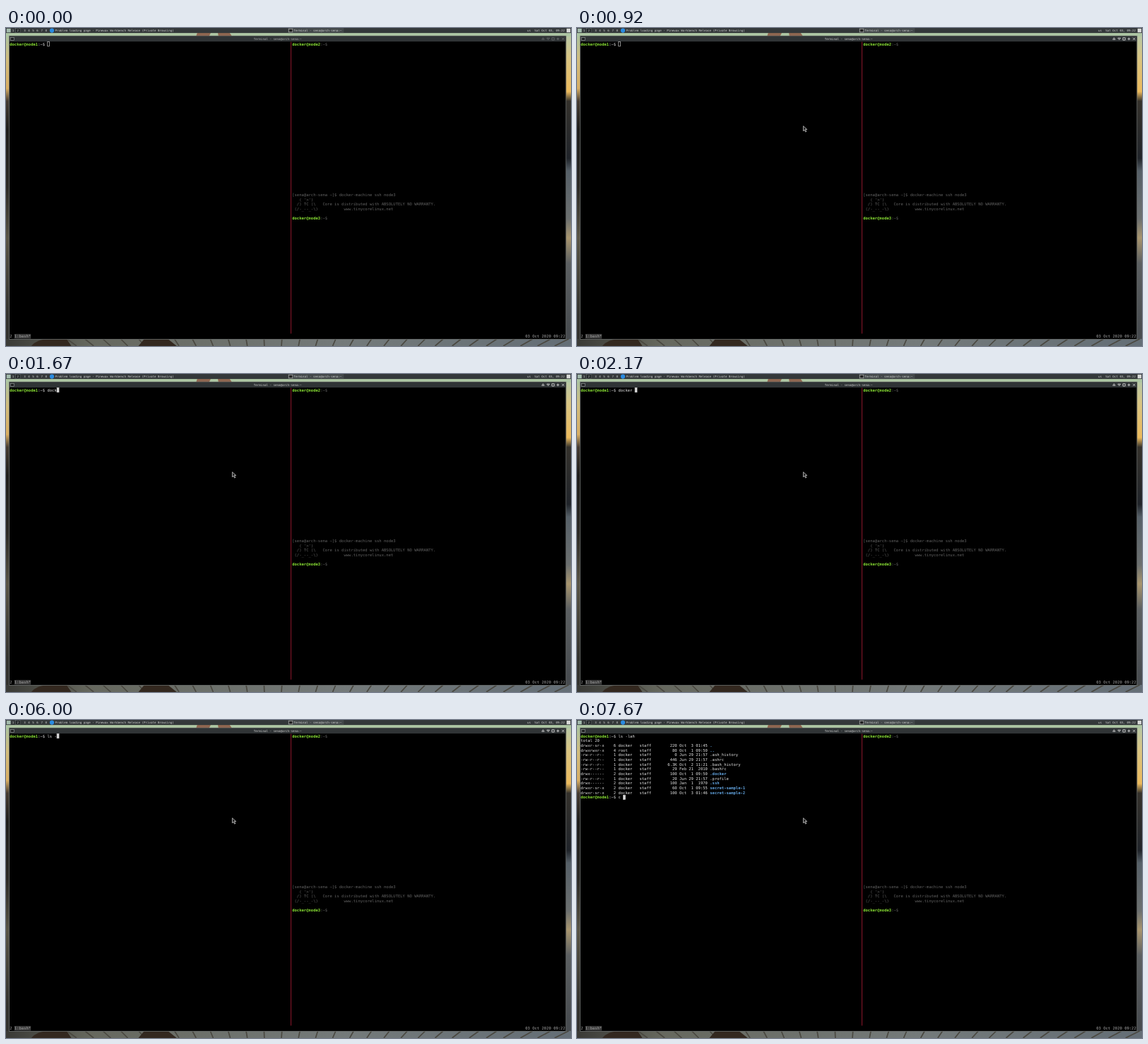
An HTML page for the animation above (8000 ms loop, 800 by 450 pixels).

```html
<!DOCTYPE html>
<html lang="en">
<head>
<meta charset="utf-8">
<title>Terminal</title>
<style>
  html, body { margin: 0; width: 100%; height: 100%; overflow: hidden; background: #000; }
  svg { display: block; width: 100vw; height: 100vh; }
  text { white-space: pre; font-family: "DejaVu Sans Mono", monospace; text-rendering: geometricPrecision; }
  .term { font-size: 13.288px; fill: #e2e2e2; }
  .bar { font-size: 10px; fill: #d0d2d0; }
  .dim { fill: #626262; }
  .user { fill: #8ae234; font-weight: bold; }
  .dir { fill: #62a4e0; font-weight: bold; }
</style>
</head>
<body>
<svg viewBox="0 0 1920 1080" preserveAspectRatio="none">
  <defs>
    <linearGradient id="left" x2="0" y2="1">
      <stop offset=".02" stop-color="#a9c3a0"/><stop offset=".1" stop-color="#d2bd7c"/>
      <stop offset=".19" stop-color="#d9ae62"/><stop offset=".23" stop-color="#463c32"/>
      <stop offset=".32" stop-color="#1e1d1b"/><stop offset=".5" stop-color="#2c2a26"/>
      <stop offset=".66" stop-color="#5a5546"/><stop offset=".9" stop-color="#33322e"/>
    </linearGradient>
    <linearGradient id="right" x2="0" y2="1">
      <stop offset=".02" stop-color="#b5c8a8"/><stop offset=".09" stop-color="#d8c584"/>
      <stop offset=".2" stop-color="#ecba5c"/><stop offset=".23" stop-color="#35322c"/>
      <stop offset=".41" stop-color="#20242a"/><stop offset=".45" stop-color="#566068"/>
      <stop offset=".6" stop-color="#6c7070"/><stop offset=".66" stop-color="#a8956e"/>
      <stop offset=".74" stop-color="#5c6062"/><stop offset=".95" stop-color="#484c50"/>
    </linearGradient>
    <linearGradient id="dock">
      <stop offset="0" stop-color="#3a3a36"/><stop offset=".15" stop-color="#66685e"/>
      <stop offset=".6" stop-color="#747a7a"/><stop offset="1" stop-color="#646e76"/>
    </linearGradient>
  </defs>

  <!-- wallpaper -->
  <rect width="960" height="1080" fill="url(#left)"/>
  <rect x="960" width="960" height="1080" fill="url(#right)"/>
  <rect y="16" width="1920" height="12" fill="#adc6a3"/>
  <path d="M650 16h46l-6 12h-44zM720 16h40l8 12h-46z" fill="#8f6650"/>
  <rect y="1056" width="1920" height="24" fill="url(#dock)"/>
  <path id="planks" stroke="#4a4840" stroke-width="4"/>
  <path d="M86 1080q20-24 60-24h60l16 24zM450 1080l20-24h80l30 24z" fill="#33281f"/>

  <!-- panel -->
  <rect width="1920" height="17" fill="#34383a"/>
  <rect x="958" width="190" height="17" fill="#43484a"/>
  <rect x="2" y="2" width="14" height="13" fill="#a4bcae"/>
  <rect x="33" y="1" width="15" height="15" fill="#202426" stroke="#70787a"/>
  <circle cx="156" cy="8.5" r="7.5" fill="#2a8be0"/>
  <rect x="961" y="3" width="13" height="11" fill="#222" stroke="#bbb" stroke-width="1.5"/>
  <rect x="1905" y="2" width="13" height="13" fill="#d8dad8"/>
  <g id="panel"></g>

  <!-- window -->
  <rect x="11" y="27" width="1892" height="1030" fill="#000" stroke="#6a6e6c" stroke-width="2"/>
  <rect x="12" y="28" width="1890" height="18" fill="#303436"/>
  <rect x="15" y="32" width="12" height="10" fill="#1c1e20" stroke="#a0a4a4" stroke-width="1.5"/>
  <g id="title"></g>
  <path id="buttons" fill="none" stroke="#d8d8d8" stroke-width="2"
    d="M1821 39l4-6 4 6zM1838 34h9l-4.500 6zM1855 33h8v8h-8zM1871 37h9m-4.500-4.500v9M1889 33l8 8m0-8l-8 8"/>

  <!-- terminal -->
  <path d="M968.500 47V1038" stroke="#a81c34" stroke-width="2"/>
  <rect x="28.500" y="1039" width="56" height="16" fill="#3a3a3a"/>
  <g id="screen"></g>
  <g id="output"></g>
  <rect id="cursor" width="7" height="15" stroke="#d8d8d8" stroke-width="1.500"/>
  <path id="pointer" d="M0 0v17l4-4 3.500 7 3-1.500-3.500-7h5.500z" fill="#222" stroke="#eee" stroke-width="1.600"/>
</svg>
<script>
const $ = id => document.getElementById(id);
const CELL = 8, ROW = 16, LEFT = 12.5, TOP = 46.5, LOOP = 8000;
const OUTPUT_AT = 6830, FOCUS_AT = 670, ACTIVE_AT = 1080;

const esc = s => s.replace(/&/g, '&amp;').replace(/</g, '&lt;').replace(/>/g, '&gt;');
const span = (cls, s) => `<tspan class="${cls}">${s}</tspan>`;
const label = (x, y, s) => `<text class="bar" x="${x}" y="${y}">${s}</text>`;
const line = (col, row, s, cls = '', id = '') =>
  `<text id="${id}" class="term ${cls}" x="${LEFT + col * CELL}" y="${TOP + row * ROW + 12.5}">${s}</text>`;
const prompt = (n, cmd = '') => span('user', 'docker@node' + n) + ':~$ ' + cmd;

// Panel and title
const title = 'Terminal - sena@arch-sena:~';
$('panel').innerHTML =
  [...'123456789'].map((n, i) => label(i < 2 ? 21 + i * 16 : 48 + (i - 1) * 14.5 - 2, 12, n)).slice(0, 8).join('') +
  label(167, 12, 'Problem loading page - Pinewax Workbench Release (Private Browsing)') +
  label(978, 12, title) + label(1771, 12, 'us') + label(1796, 12, 'Sat Oct 03, 09:22');
$('title').innerHTML = label(842, 41, title);

// Dock boards
let boards = '';
for (let x = 240; x < 1920; x += 58) boards += `M${x} 1080l${(x - 900) / 20} -24`;
$('planks').setAttribute('d', boards);

// Fixed terminal text
$('screen').innerHTML =
  line(0, 0, prompt(1, '<tspan id="cmd"></tspan>')) +
  line(120, 0, prompt(2), 'dim') +
  [
    '[sena@arch-sena ~]$ docker-machine ssh node3',
    "   ( '>')",
    '  /) TC (\\   Core is distributed with ABSOLUTELY NO WARRANTY.',
    ' (/-_--_-\\)           www.tinycorelinux.net'
  ].map((s, i) => line(120, 32 + i, esc(s), 'dim')).join('') +
  line(120, 37, prompt(3), 'dim') +
  line(0, 62, '2 1:bash*', 'status') +
  line(219, 62, '03 Oct 2020 09:22', 'status');
document.querySelectorAll('.status').forEach(e => e.style.fill = '#a4a4a4');

// Directory listing
const files = `drwxr-sr-x|6|docker|220|Oct  3 01:45|.
drwxrwxr-x|4|root|80|Oct  1 09:50|..
-rw-r--r--|1|docker|0|Jun 29 21:57|.ash_history
-rw-r--r--|1|docker|446|Jun 29 21:57|.ashrc
-rw-r--r--|1|docker|6.3K|Oct  2 11:21|.bash_history
-rw-r--r--|1|docker|29|Feb 21  2010|.bashrc
drwx------|2|docker|100|Oct  1 09:50|.docker
-rw-r--r--|1|docker|20|Jun 29 21:57|.profile
drwx------|2|docker|100|Jan  1  1970|.ssh
drwxr-sr-x|2|docker|60|Oct  1 09:55|secret-sample-1
drwxr-sr-x|2|docker|100|Oct  3 01:46|secret-sample-2`.split('\n');
$('output').innerHTML = line(0, 1, 'total 20') + files.map((f, i) => {
  const [mode, links, user, size, date, name] = f.split('|');
  const text = mode + links.padStart(5) + ' ' + user.padEnd(9) + 'staff'.padEnd(9) +
    size.padStart(7) + ' ' + date + ' ';
  return line(0, 2 + i, text + (mode[0] === 'd' ? span('dir', name) : name));
}).join('') + line(0, 13, prompt(1, '<tspan id="next"></tspan>'));

// Keystrokes: time and the command line after it
const first = [
  [0, ''], [1330, 'd'], [1420, 'do'], [1580, 'doc'], [1670, 'dock'], [1830, 'docke'],
  [1920, 'docker'], [2080, 'docker '], [5250, ''], [5670, 'l'], [5830, 'ls'],
  [5920, 'ls '], [6000, 'ls -'], [6170, 'ls -l'], [6420, 'ls -la'], [6500, 'ls -lah']
];
const second = [[0, ''], [7330, 'c'], [7670, 'c ']];
const typed = (keys, t) => keys.filter(k => k[0] <= t).pop()[1];

function draw() {
  const t = performance.now() % LOOP;
  const done = t >= OUTPUT_AT;
  const cmd = typed(first, t), next = typed(second, t);
  $('cmd').textContent = cmd;
  $('next').textContent = next;
  $('output').style.display = done ? '' : 'none';

  const col = 16 + (done ? next : cmd).length;
  $('cursor').setAttribute('x', LEFT + col * CELL + .5);
  $('cursor').setAttribute('y', TOP + (done ? 13 : 0) * ROW + .5);
  $('cursor').setAttribute('fill', t < ACTIVE_AT ? 'none' : '#d8d8d8');

  $('buttons').style.opacity = t < FOCUS_AT ? .3 : 1;
  $('title').style.opacity = t < FOCUS_AT ? .8 : 1;

  // The pointer glides in from the right edge
  const p = Math.min(1, Math.max(0, (t - 80) / 420));
  const rest = (1 - p) ** 3;
  $('pointer').setAttribute('transform', `translate(${769 + 1155 * rest} ${333 + 300 * rest})`);
  requestAnimationFrame(draw);
}
draw();
</script>
</body>
</html>
```
